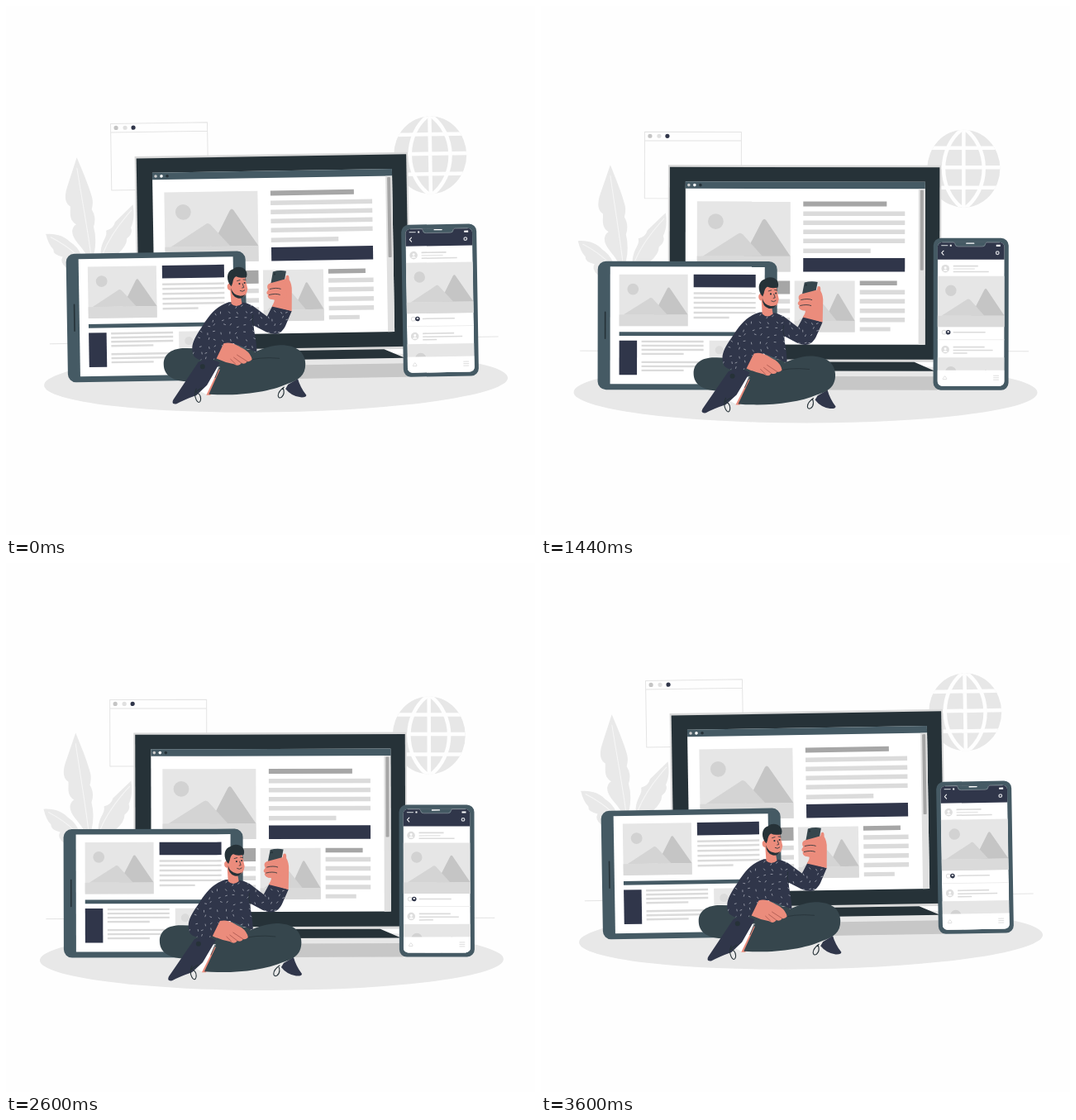
Recreate the animation shown at these times as an HTML page. Size 640x640 px, loop 3.62 s.

```html
<!DOCTYPE html>
<html lang="en">
<head>
<meta charset="utf-8">
<title>Responsive devices</title>
<style>
  html, body { margin: 0; width: 100%; height: 100%; overflow: hidden; background: #fefefe; }
  svg { display: block; width: 100vw; height: 100vh; }
</style>
</head>
<body>
<svg viewBox="0 0 640 640"><g id="scene"></g></svg>
<script>
const NAVY = '#30364a', DARK = '#263238', SLATE = '#455a64', TROUSERS = '#36464d';
const SKIN = '#eb8c7c', PALE = '#e7e7e7', LINE = '#dbdbdb', GREY = '#a6a6a6', WHITE = '#fff';

const rect = (x, y, w, h, fill, r = 0) =>
  `<rect x="${x}" y="${y}" width="${w}" height="${h}" rx="${r}" fill="${fill}"/>`;
const oval = (x, y, rx, ry, fill) =>
  `<ellipse cx="${x}" cy="${y}" rx="${rx}" ry="${ry}" fill="${fill}"/>`;
const dot = (x, y, r, fill) => oval(x, y, r, r, fill);
const shape = (d, fill) => `<path d="${d}" fill="${fill}"/>`;
const stroke = (d, color, width = 1) =>
  `<path d="${d}" fill="none" stroke="${color}" stroke-width="${width}" stroke-linecap="round" stroke-linejoin="round"/>`;
const clip = (id, outline, content) =>
  `<clipPath id="${id}">${outline}</clipPath><g clip-path="url(#${id})">${content}</g>`;
const bars = (x, w, h, fill, ys) => ys.map(y => rect(x, y, w, h, fill)).join('');

// Placeholder picture: sun, two peaks and a foreground band
function picture(x, y, w, h) {
  const at = (u, v) => `${x + u * w} ${y + v * h}`;
  return rect(x, y, w, h, '#e6e6e6') +
    dot(x + .2 * w, y + .285 * h, .083 * w, '#d2d2d2') +
    shape(`M${at(.5, .78)}L${at(.7, .27)}Q${at(.72, .23)} ${at(.74, .27)}L${at(1, .78)}Z`, '#c5c5c5') +
    shape(`M${at(.06, .78)}L${at(.43, .47)}Q${at(.46, .43)} ${at(.49, .47)}L${at(.7, .78)}Z`, '#d4d4d4') +
    rect(x, y + .78 * h, w, .22 * h, '#dadada');
}

function background() {
  const globe = rect(467, 148, 90, 97, '#e7e7e7') +
    stroke('M467 171H557M467 194.5H557M467 219H557M511.5 148V245', '#fefefe', 4.5) +
    stroke('M511.5 147C479 170 479 222 511.5 245C544 222 544 170 511.5 147Z', '#fefefe', 4.5);
  return oval(320.5, 467, 280.5, 37, '#e8e8e8') +
    stroke('M48 417H590', '#dedede', .8) +
    clip('globe', oval(511.5, 196, 44, 47, WHITE), globe) +
    stroke('M125.5 152H242.5V232.5H125.5ZM125.5 162.5H242.5', '#e4e4e4', 1) +
    dot(132, 157, 2.6, '#c4c4c4') + dot(143, 157, 2.6, '#e0e0e0') + dot(153, 157, 2.6, NAVY) +
    shape('M84 192C90 207 98 226 102 242Q103 249 101 255Q107 265 103 276Q107 292 103 309L93 309C88 299 77 292 77 281Q78 275 82 273C72 267 76 256 75 251C66 245 70 232 73 224Z', '#e9e9e9') +
    shape('M45 284C57 283 68 287 74 294Q83 300 87 309L69 325Q61 318 65 312Q53 309 54 303Q48 297 45 284Z', '#e9e9e9') +
    shape('M151 250C153 264 151 272 148 278Q151 285 143 291Q143 300 132 309L111 309C112 292 120 290 118 281Q127 279 129 271Z', '#e9e9e9') +
    stroke('M84 205C89 240 95 275 99 308M51 288Q70 298 83 311M149 257Q124 284 114 308', '#f7f7f7', 1);
}

function monitor() {
  return rect(154, 192, 330.5, 238, '#dadada') + rect(156, 194.5, 326.5, 232.5, DARK) +
    rect(330, 441, 150, 7, PALE) + rect(340, 447.5, 140, 16.5, '#c7c7c7') +
    shape('M320 430H452L477 441H320Z', DARK) +
    rect(175, 212, 290, 197, WHITE) + rect(175, 212, 290, 8.5, SLATE) +
    dot(179, 216.3, 1.8, '#ccc') + dot(186, 216.3, 1.8, WHITE) + dot(193, 216.3, 1.8, DARK) +
    rect(457, 220.5, 8, 188.5, '#e0e0e0') + rect(459, 222, 4, 97, GREY, 1) +
    picture(189, 236, 113, 85) +
    rect(317.5, 236, 101, 6, GREY) +
    bars(317.5, 123, 5.5, LINE, [248, 259, 270, 281]) + rect(317.5, 293, 81.5, 5.5, LINE) +
    rect(317.5, 304.5, 123, 16.5, NAVY) +
    rect(256, 332, 45.5, 16, GREY) + bars(256, 45.5, 5.5, LINE, [354, 365.5, 376.5]) +
    picture(307, 332, 73, 62) +
    rect(386, 332, 45, 5.5, GREY) +
    bars(386, 54.5, 5.5, LINE, [343, 354, 365.5, 376.5]) + rect(386, 388, 37, 5, LINE);
}

function tablet() {
  return rect(69, 308.5, 217, 155.5, SLATE, 10) + rect(84, 315, 187, 142, WHITE) +
    stroke('M78 370V402', DARK, 1.6) +
    picture(95, 324.5, 83, 62.5) +
    rect(185, 324.5, 75, 15.5, NAVY) +
    bars(185, 75, 2.4, LINE, [346, 351.5, 357.5, 363.5, 369.5]) + rect(185, 375.5, 43, 2.4, LINE) +
    rect(95, 394, 165, 4.8, SLATE) + rect(95, 404.5, 21.5, 41.5, NAVY) +
    bars(122, 75, 2.3, LINE, [404.5, 409.5, 414.5, 429.5, 434.5]) +
    bars(122, 51, 2.3, LINE, [419.5, 439.5]) +
    rect(204, 404.5, 56, 20, PALE) + dot(216, 416, 5, LINE) +
    bars(204, 56, 2.3, LINE, [429.5, 434.5, 439.5]);
}

function phone() {
  const avatar = y => dot(489.5, y, 4.8, '#dedede') + dot(489.5, y - 1, 1.5, WHITE) +
    shape(`M486.5 ${y + 3}Q489.5 ${y - 1} 492.5 ${y + 3}Z`, WHITE);
  const screen = rect(480, 285, 81, 174, WHITE) + rect(480, 285, 81, 21, NAVY) +
    rect(501, 283, 37, 7, SLATE, 2) +
    stroke('M485 289H492', '#b9bec4', 1.3) + rect(495, 288, 2, 2, WHITE) + rect(551, 288, 5, 2.2, WHITE) +
    stroke('M487.3 295.5L485 298L487.3 300.5', WHITE, 1) +
    `<circle cx="552.5" cy="298" r="1.8" fill="none" stroke="#d5d7dc" stroke-width="1.3"/>` +
    avatar(317) + rect(499, 313, 30, 1.7, LINE) + rect(499, 316.6, 26, 1.5, PALE) + rect(499, 320, 43, 1.5, LINE) +
    picture(480, 326, 81, 61.5) +
    `<circle cx="488" cy="394" r="2.4" fill="none" stroke="#ddd"/>` + dot(493, 394, 2.8, NAVY) +
    rect(492, 392.5, 2, 2, WHITE) + rect(499, 393.2, 39, 1.5, LINE) + rect(480, 402.5, 81, 1, '#eee') +
    avatar(415) + rect(499, 411, 38, 1.7, LINE) + rect(499, 415, 48, 1.5, LINE) + rect(499, 418.6, 17, 1.5, LINE) +
    picture(480, 424.5, 81, 61.5) + rect(480, 440, 81, 20, WHITE) +
    stroke('M487 449.5L489 447L491 449.5V451H487Z', '#ddd', .9) +
    stroke('M548 446.5H554M548 449H554M548 451.5H554', LINE, .9);
  return rect(475, 280, 91, 184, SLATE, 9) +
    clip('screen', rect(480, 285, 81, 174, WHITE, 6), screen) +
    stroke('M486 285.3H499Q501 285.3 501.5 288Q502 290.3 505 290.3H534Q537 290.3 537.5 288Q538 285.3 540 285.3H555', '#a9b3b8', .5) +
    stroke('M515 286.5H524', WHITE, 1.3);
}

// Short dashes on a jittered grid, seeded so they stay the same
function shirtDashes() {
  let seed = 7, d = '';
  const random = () => (seed = seed * 16807 % 2147483647) / 2147483647;
  for (let y = 372; y < 440; y += 8)
    for (let x = 218; x < 342; x += 9) {
      const angle = random() * Math.PI;
      d += `M${x + random() * 5} ${y + random() * 4}l${2 * Math.cos(angle)} ${2 * Math.sin(angle)}`;
    }
  return stroke(d, '#c3c6cf', .65);
}

function person() {
  const shirt = 'M265 370C249 375 241 385 231 401C221 415 217 424 222 435C228 442 243 441 250 438L257 423L270 420L298 431C298 416 294 404 295 399L310 407C322 412 328 409 333 400L341 382L318 375L311 388L294 375Q287 371 279 370Z';
  const legs =
    shape('M225 465C200 467 185 460 185 444C185 430 198 424 213 425L298 428L272 455Z', TROUSERS) +
    shape('M228 477L246 448L253 448L238 482Z', WHITE) +
    shape('M236 482L251 452L255 450L241 482Z', SKIN) +
    shape('M335 471L347 464Q350 475 357 484Q357 487 350 486.5Q339 485 332 476Z', NAVY) +
    shape('M239 481L255 447C278 442 300 424 326 423C346 423 356.5 432 356.5 446C356.5 460 348 466 334 470C311 480 272 484 239 481Z', TROUSERS) +
    shape('M196 487L227 442Q240 435 253 443L237 470L224 482Q209 487 200 492Q193 493 196 487Z', NAVY) +
    dot(232, 447.5, 3, DARK) +
    stroke('M280 443Q300 436 325 439M252 449L247 461', DARK, .8) +
    stroke('M224 474C219 484 227 496 229 488C230 482 226 479 223 478L231 473M330 474C320 481 322 489 327 486C331 483 330 478 329 475', DARK, 1.1);
  const head =
    shape('M267 355L268 372Q274 378 281 372L279 361Z', SKIN) +
    shape('M267 343L284 334L286.5 347L288 354Q287 364 279 365Q271 365 268 356Q263 356 263.5 350Q265 346 268 348Z', SKIN) +
    shape('M268 353Q270 361 278 362.5Q282 363 285 361Q282 366.5 276 365.5Q268 363 268 353Z', DARK) +
    shape('M266 348C262 340 264 332 271 330Q276 326 283 329Q289 333 287 340Q279 342 274 339Q271 341 270 347L268.5 351Z', DARK) +
    dot(278.3, 348, 1.1, DARK) + dot(284.5, 347, 1, DARK) +
    stroke('M275.5 344.5L279 343.5M283 343L286 343.5M282 348L283.5 352.5L281.5 353M279 356.5Q282 358.5 284.5 356', DARK, .8);
  const hands =
    shape('M249 438L258 420C268 417 276 424 284 428Q291 433 292 440Q289 443 286 442Q284 446 279 444Q276 449 270 445Q259 443 249 438Z', SKIN) +
    stroke('M274 434L286 442M270 437L279 444M266 439L272 445', '#a8564f', .8) +
    shape('M333 347L335 339Q339 337 338.5 344Q342 350 341.5 358L341 382L317 376Q321 370 320 368Q313 368 312 363Z', SKIN) +
    shape('M319 334Q327 332 335 333.5L331 354L315 355Z', TROUSERS) + dot(321, 337, 1.2, DARK) +
    shape('M315 348Q323 346 334 343L335 365L321 368Q312 368 313 362Q309 360 313 356Q310 350 315 348Z', SKIN) +
    stroke('M315 355Q323 353 328 355M314 362Q322 360 327 362', DARK, .8);
  return legs + shape(shirt, NAVY) + clip('shirt', `<path d="${shirt}"/>`, shirtDashes()) +
    stroke('M294 386Q292 394 295 399M250 438L257 423', DARK, .8) + head + hands;
}

const scene = document.getElementById('scene');
scene.innerHTML = background() + monitor() + tablet() + phone() + person();

// Slow bob combined with a faster one-degree sway
const LOOP = 3620, TURN = 2 * Math.PI;
const start = performance.now();
function render(now) {
  const t = Math.max(0, now - start) % LOOP;
  const lift = 3.5 - 10.9 * Math.cos(TURN * t / 1800);
  const tilt = -Math.cos(TURN * (t + 72) / 1200);
  scene.setAttribute('transform', `translate(0 ${lift}) rotate(${tilt} 0 90)`);
  requestAnimationFrame(render);
}
render(start);
</script>
</body>
</html>
```
